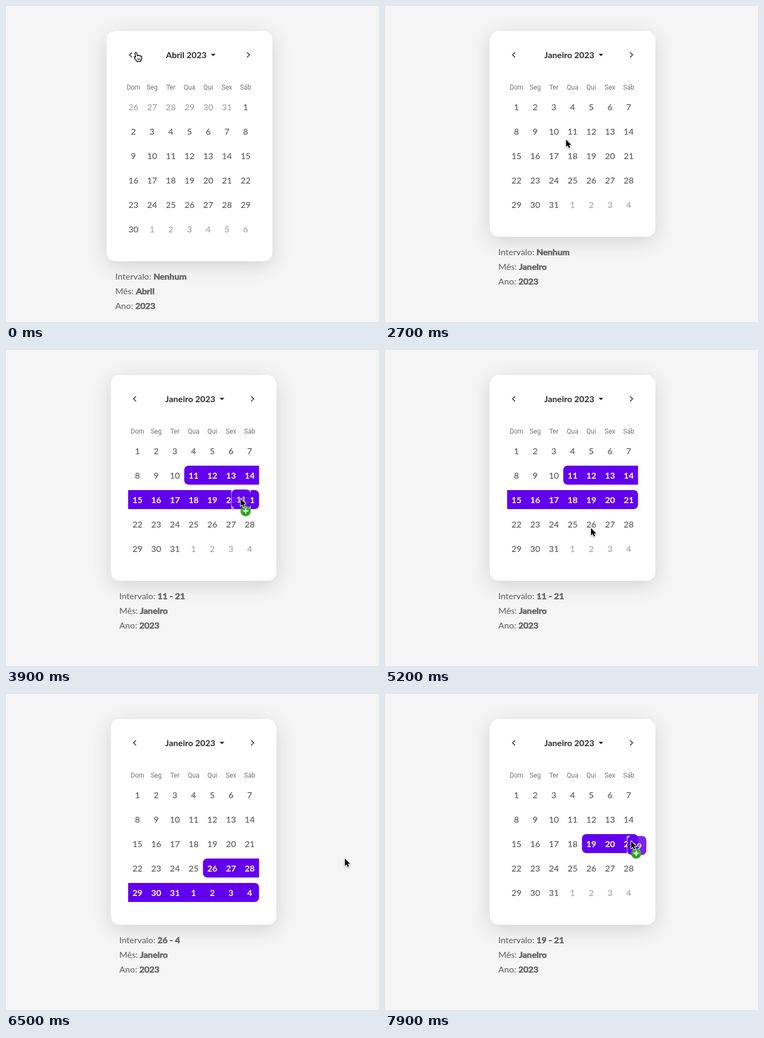
Animation, 688 px wide and 582 px high, one loop 8000 ms. Source, as an HTML page with a canvas:

```html
<!DOCTYPE html>
<html lang="pt">
<head>
<meta charset="utf-8">
<title>Calendário</title>
<style>
html, body { margin: 0; width: 100%; height: 100%; overflow: hidden; background: #f5f5f5; }
canvas { display: block; width: 688px; height: 582px; }
</style>
</head>
<body>
<canvas id="stage"></canvas>
<script>
const W = 688, H = 582, LOOP = 8000, STEP = 100;
const CELL = 34.5, ROW = 45, PILL = 35;
const PURPLE = '#6200ee', GREY = '#666', INK = '#2b2b2b';
const WEEK = 'Dom Seg Ter Qua Qui Sex Sáb'.split(' ');
const MONTHS = ('Janeiro Fevereiro Março Abril Maio Junho Julho ' +
  'Agosto Setembro Outubro Novembro Dezembro').split(' ');

// Click times of the header buttons, then drag and drop times
const BACK = [300, 700, 1000, 1200], NEXT = [2300];
const DRAGS = [[3300, 4100], [5300, 5500], [7200, LOOP]];

// Pointer moves: begin, end, goal; it rests in between
const HOME = [240, 86];
const MOVES = [
  [200, 400, 238.5, 91.5],
  [1500, 2000, 525, 104],
  [2000, 2300, 453, 89],
  [2400, 2700, 334, 246],
  [2700, 3000, 345, 230],
  [3300, 4000, 433, 274],
  [4100, 4400, 256, 500],
  [4400, 4700, 585, 530],
  [4700, 5200, 380, 328],
  [5300, 5400, 450, 361],
  [5600, 5900, 248, 361],
  [5900, 6300, 558, 306],
  [6400, 6500, 625, 303],
  [6500, 7000, 370, 267.5],
  [7200, 7900, 454, 271]
];

const canvas = document.getElementById('stage');
const ctx = canvas.getContext('2d');
const dpr = window.devicePixelRatio || 1;
canvas.width = W * dpr;
canvas.height = H * dpr;

const clamp = (v, lo, hi) => Math.max(lo, Math.min(hi, v));
const easeOut = k => 1 - (1 - k) ** 3;

function pointerAt(t) {
  let [x, y] = HOME;
  for (const [from, to, goalX, goalY] of MOVES) {
    const k = easeOut(clamp((t - from) / (to - from), 0, 1));
    x += (goalX - x) * k;
    y += (goalY - y) * k;
  }
  return [x, y];
}

function pageAt(t) {
  const clicks = times => times.filter(time => time <= t).length;
  const date = new Date(Date.UTC(2023, 3 + clicks(NEXT) - clicks(BACK), 1));
  const year = date.getUTCFullYear(), month = date.getUTCMonth(), first = date.getUTCDay();
  const days = new Date(Date.UTC(year, month + 1, 0)).getUTCDate();
  const rows = Math.ceil((first + days) / 7);
  // A sixth row brings a scrollbar that shifts the page
  return { year, month, first, rows, cx: rows > 5 ? 338.5 : 346 };
}

function dayOf(page, i) {
  const date = new Date(Date.UTC(page.year, page.month, 1 - page.first + i));
  return { n: date.getUTCDate(), inside: date.getUTCMonth() === page.month };
}

const cellX = (page, i) => page.cx + (i % 7 - 3) * CELL;
const cellY = i => 185.5 + Math.floor(i / 7) * ROW;

function cellUnder([x, y], page) {
  const col = Math.floor((x - page.cx) / CELL + 3.5);
  const row = Math.floor((y - 163) / ROW);
  return clamp(col, 0, 6) + 7 * clamp(row, 0, page.rows - 1);
}

const lato = weight => `${weight} 16px Lato, sans-serif`;

function text(str, x, y, font, color, align = 'center') {
  ctx.font = font;
  ctx.fillStyle = color;
  ctx.textAlign = align;
  ctx.fillText(str, x, y);
  return ctx.measureText(str).width;
}

function box(x, y, w, h, r, color) {
  ctx.beginPath();
  ctx.roundRect(x, y, w, h, r);
  ctx.fillStyle = color;
  ctx.fill();
}

function shadow(color, blur, dy) {
  ctx.shadowColor = color;
  ctx.shadowBlur = blur * dpr;
  ctx.shadowOffsetY = dy * dpr;
}

function line(points, width, color) {
  ctx.beginPath();
  points.forEach(([x, y]) => ctx.lineTo(x, y));
  ctx.lineWidth = width;
  ctx.strokeStyle = color;
  ctx.stroke();
}

function drawCard(page) {
  ctx.save();
  shadow('rgba(0,0,0,.14)', 36, 8);
  box(page.cx - 152.8, 46, 305.6, 154 + page.rows * ROW, 16, '#fff');
  ctx.restore();
}

function drawHeader(page) {
  const { cx, year, month } = page;
  const width = text(`${MONTHS[month]} ${year}`, cx - 6, 96, lato(700), INK);
  const x = cx + width / 2 + 2;
  ctx.beginPath();
  ctx.moveTo(x, 88);
  ctx.lineTo(x + 8.4, 88);
  ctx.lineTo(x + 4.2, 92.6);
  ctx.fill();
  for (const side of [-1, 1]) {
    const end = cx + side * 106.1;
    line([[end, 85.4], [end + side * 4.6, 90], [end, 94.6]], 2, '#555');
  }
  WEEK.forEach((name, i) => text(name, cellX(page, i), 154, '12px Roboto, sans-serif', '#707070'));
}

function drawRange(page, [a, b]) {
  for (let row = Math.floor(a / 7); row <= Math.floor(b / 7); row++) {
    const from = Math.max(a, row * 7), to = Math.min(b, row * 7 + 6);
    const l = from === a ? 8 : 0, r = to === b ? 8 : 0;
    box(cellX(page, from) - CELL / 2, cellY(from) - PILL / 2, (to - from + 1) * CELL, PILL, [l, r, r, l], PURPLE);
  }
}

function drawDays(page, range) {
  for (let i = 0; i < page.rows * 7; i++) {
    const { n, inside } = dayOf(page, i);
    const picked = range && i >= range[0] && i <= range[1];
    const color = picked ? '#fff' : inside ? '#585858' : '#a0a0a0';
    text(n, cellX(page, i), cellY(i) + 6.5, lato(picked ? 700 : 500), color);
  }
}

function drawSummary(page, range) {
  const span = range ? range.map(i => dayOf(page, i).n).join(' - ') : 'Nenhum';
  const facts = { Intervalo: span, Mês: MONTHS[page.month], Ano: page.year };
  Object.entries(facts).forEach(([label, value], i) => {
    const y = 234 + page.rows * ROW + i * 27;
    const x = page.cx - 138 + 1;
    const valueX = x + text(`${label}: `, x, y, lato(500), GREY, 'left');
    text(value, valueX, y, lato(700), GREY, 'left');
    ctx.lineWidth = 0.7;
    ctx.strokeStyle = GREY;
    ctx.strokeText(value, valueX, y);
  });
}

// Translucent copy of the grabbed day, with white corners
function drawGhost(page, cell, x, y) {
  const half = PILL / 2;
  ctx.save();
  ctx.globalAlpha = 0.85;
  ctx.beginPath();
  ctx.rect(x - half - 0.8, y - half, PILL + 0.8, PILL);
  ctx.roundRect(x - half, y - half, PILL, PILL, 8);
  ctx.fillStyle = '#fff';
  ctx.fill('evenodd');
  box(x - half, y - half, PILL, PILL, 8, PURPLE);
  text(dayOf(page, cell).n, x, y + 6.5, lato(700), '#fff');
  ctx.restore();
}

function drawBadge(x, y) {
  const g = ctx.createLinearGradient(0, y - 9, 0, y + 9);
  g.addColorStop(0, '#4fc03a');
  g.addColorStop(1, '#1a9a0c');
  ctx.save();
  shadow('rgba(0,0,0,.3)', 3, 1);
  box(x - 9.3, y - 9.3, 18.6, 18.6, 9.3, g);
  ctx.restore();
  line([[x - 5, y], [x + 5, y]], 2.2, '#fff');
  line([[x, y - 5], [x, y + 5]], 2.2, '#fff');
}

const ARROW = new Path2D('M0 0V13.6L3.1 10.7L5.2 15.5L7.5 14.5L5.4 9.8H9.6Z');
const HAND = new Path2D('M-2 1C-2 -.7 .8 -.7 1.2 1L2.2 6C2.6 4.6 4.6 4.6 5 6C5.6 5 7.4 5.2 7.7 6.6' +
  'C8.6 5.8 10 6.4 10 8V10.5C10 13 8.5 13.5 8.2 16H1C.5 13.5 -2 12 -3 9.5C-4 7.5 -3 6.6 -1.6 7.6L-.8 8.4Z');
const FOLDS = new Path2D('M2.7 10.2L3 13.8M4.9 10.2V13.8M7 10.2L6.9 13.8');

function drawPointer(page, [x, y]) {
  const dx = Math.abs(x - page.cx);
  const hand = y < 106 && (Math.abs(dx - 104) < 14 || dx < 70);
  const shape = hand ? HAND : ARROW;
  ctx.save();
  ctx.translate(x, y);
  ctx.lineJoin = 'round';
  shadow('rgba(0,0,0,.35)', 3, 1);
  ctx.lineWidth = hand ? 1.2 : 2.2;
  ctx.strokeStyle = hand ? '#000' : '#fff';
  ctx.stroke(shape);
  shadow('transparent', 0, 0);
  ctx.fillStyle = hand ? '#fff' : '#000';
  ctx.fill(shape);
  if (hand) {
    ctx.stroke(HAND);
    ctx.lineWidth = 0.9;
    ctx.stroke(FOLDS);
  }
  ctx.restore();
}

// Last drag begun by t, with its picked range
function dragAt(t, page) {
  const drag = DRAGS.filter(([from]) => from <= t).pop();
  if (!drag) return null;
  const [from, to] = drag;
  const grab = pointerAt(from), cell = cellUnder(grab, page);
  const end = cellUnder(pointerAt(Math.min(t, to)), page);
  return { grab, cell, active: t < to, range: [Math.min(cell, end), Math.max(cell, end)] };
}

function draw(t) {
  const page = pageAt(t), pointer = pointerAt(t), drag = dragAt(t, page);
  const range = drag && drag.range;
  const [x, y] = pointer;
  ctx.setTransform(dpr, 0, 0, dpr, 0, 0);
  ctx.fillStyle = '#f5f5f5';
  ctx.fillRect(0, 0, W, H);
  drawCard(page);
  drawHeader(page);
  if (range) drawRange(page, range);
  drawDays(page, range);
  drawSummary(page, range);
  if (drag && drag.active) {
    const { cell, grab } = drag;
    drawGhost(page, cell, x + cellX(page, cell) - grab[0], y + cellY(cell) - grab[1]);
    drawBadge(x + 9.3, y + 22.5);
  }
  drawPointer(page, pointer);
}

const start = performance.now();
function tick() {
  const t = (performance.now() - start) % LOOP;
  draw(Math.floor(t / STEP) * STEP);
  requestAnimationFrame(tick);
}
tick();
</script>
</body>
</html>
```
